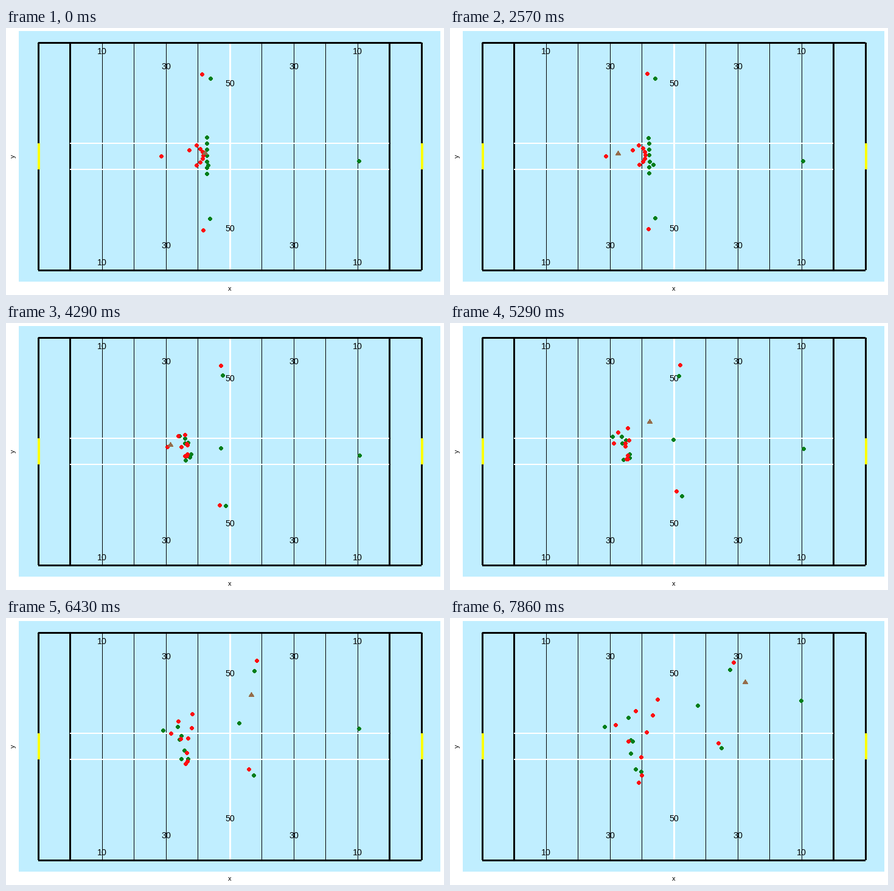
Animation of 720x440 px, one loop 8000 ms. Source, as a matplotlib script:

```python
import numpy as np
import matplotlib.pyplot as plt
from matplotlib.animation import FuncAnimation
from matplotlib.patches import Circle, Polygon, Rectangle

W, H, DPI = 720, 440, 100
FRAMES, LOOP_MS = 56, 8000
SKY, RED, GREEN, BROWN = "#c0eeff", "#ff0d10", "#007e1a", "#956c4a"

# Steps at which the play starts, the pocket forms and the loop ends.
SNAP, POCKET, END = 13, 37, 55
CATCH, RELEASE = 18.5, 31.3


def line_spot(k):
    """Blockers stand in a shallow arc."""
    y = 193 + 5.5 * k
    return 324 - 0.04 * (y - 209.5) ** 2, y


def front_spot(k):
    """Rushers stand in a straight, even row."""
    return 330, 180 + 10 * k


# For the two fronts: where each man is in the pocket and at the end.
line_keys = [
    ((276, 180), (305, 153)), ((292, 173), (341, 134)), ((288, 198), (293, 203)),
    ((294, 193), (333, 160)), ((292, 218), (314, 229)), ((292, 224), (315, 259)),
    ((290, 224), (310, 271)),
]
front_keys = [
    ((267, 187), (254, 179)), ((282, 187), (293, 164)), ((283, 198), (300, 203)),
    ((289, 193), (297, 201)), ((295, 216), (297, 223)), ((295, 222), (314, 253)),
    ((285, 225), (305, 249)),
]
passer = (255, 211), (269, 198), (272, 176)
offense = [(line_spot(k), *keys) for k, keys in enumerate(line_keys)] + [
    passer,
    ((322, 76), (378, 69), (466, 73)),
    ((324, 333), (372, 277), (441, 206)),
    ((301, 201), (288, 203), (323, 188)),
]
defense = [(front_spot(k), *keys) for k, keys in enumerate(front_keys)] + [
    ((336, 83), (376, 87), (460, 85)),
    ((335, 314), (381, 285), (446, 214)),
    ((332, 226), (367, 192), (407, 144)),
    ((580, 219), (581, 207), (577, 136)),
]


def player_at(t, path):
    """Start from rest at the snap and run smoothly through the key points."""
    times = np.array([SNAP, POCKET, END], float)
    points = np.array(path, float)
    slopes = np.gradient(points, times, axis=0, edge_order=2)
    slopes[0] = 0
    i = int(t >= POCKET)
    h = times[i + 1] - times[i]
    u = max(t - times[i], 0) / h
    blend = u * u * (3 - 2 * u)
    return (points[i] + blend * (points[i + 1] - points[i])
            + h * u * (1 - u) * ((1 - u) * slopes[i] - u * slopes[i + 1]))


def ball_at(t):
    """Snapped to the passer, carried, then thrown with falling speed."""
    if t < RELEASE:
        spot = np.array([327, 205])
        held = player_at(t, passer) + (5, -4)
        return spot + (held - spot) * np.clip((t - 12) / (CATCH - 12), 0, 1)
    u = (t - RELEASE) / (END - RELEASE)
    drag = np.array([0.15, 0.8])
    return (271, 198) + np.array([214, -93.5]) * (u + drag * u * (1 - u))


def to_pixel(point):
    return np.floor(point + 0.5) + 0.5


fig = plt.figure(figsize=(W / DPI, H / DPI), dpi=DPI, facecolor="white")
ax = fig.add_axes([0, 0, 1, 1])
ax.set_xlim(0, W)
ax.set_ylim(H, 0)
ax.axis("off")


def box(x0, y0, x1, y1, color, z=1):
    ax.add_patch(Rectangle((x0, y0), x1 - x0, y1 - y0, fc=color, lw=0,
                           antialiased=False, zorder=z))


def vline(x, width, color="black", y0=24, y1=399, z=1):
    left = x - (width - 1) // 2
    box(left, y0, left + width, y1, color, z)


def hline(y, width, color, x0, x1, z=1):
    top = y - width // 2
    box(x0, top, x1, top + width, color, z)


def label(x, y, text, px, **kw):
    ax.text(x, y, text, family="Liberation Sans", fontsize=px * 72 / DPI,
            ha="center", va="baseline", zorder=3, **kw)


def draw_field():
    box(21, 5, 714, 418, SKY, 0)
    for k in range(1, 10):
        if k != 5:
            vline(int(105.5 + 52.5 * k), 1)
    vline(368, 3, "white")
    for x in (53, 105, 630, 683):
        vline(x, 3, z=2)
    for y in (24, 399):
        hline(y, 3, "black", 53, 683, z=2)
    for y in (190, 233):
        hline(y, 2, "white", 105, 630, z=2)
    for x in (53, 683):
        vline(x, 4, "yellow", 190, 233, z=2)
    for yards, top, bottom in ((10, 38, 386), (30, 63, 358), (50, 91, 330)):
        offset = 5.25 * (50 - yards)
        for x in {368 - offset, 368 + offset}:
            for y in (top, bottom):
                label(x, y + 5, str(yards), 14.2)
    label(368, 433, "x", 11)
    label(15, 211, "y", 11, rotation=90, rotation_mode="anchor")


def make_dots(paths, color, z):
    # Aliased fills cover every touched pixel, so this radius paints 7 px.
    return [(ax.add_patch(Circle(path[0], 2.7, fc=color, lw=0, antialiased=False,
                                 zorder=z)), path) for path in paths]


draw_field()
players = make_dots(defense, GREEN, 4) + make_dots(offense, RED, 5)
BALL_SHAPE = np.array([(0, -4), (4, 3), (-4, 3)])
ball = ax.add_patch(Polygon(BALL_SHAPE, closed=True, fc=BROWN, lw=0,
                            antialiased=False, zorder=6))


def update(step):
    for dot, path in players:
        dot.center = to_pixel(player_at(step, path))
    ball.set_xy(to_pixel(ball_at(step)) + BALL_SHAPE)
    return [dot for dot, _ in players] + [ball]


anim = FuncAnimation(fig, update, frames=FRAMES, interval=LOOP_MS / FRAMES,
                     repeat=True, repeat_delay=0)
plt.show()
```
